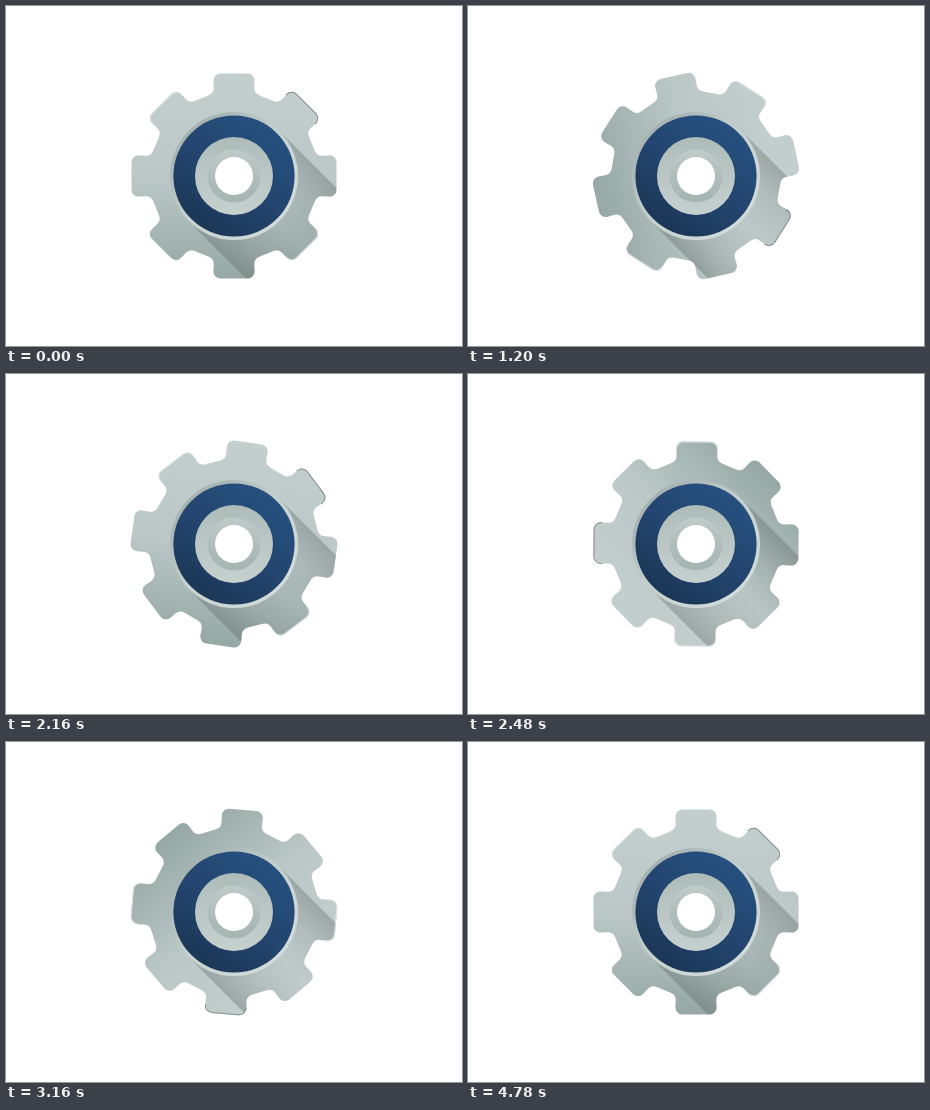
These frames come from a looping animation (456 by 340 pixels, 4800 ms). An HTML page with a canvas:

```html
<!DOCTYPE html>
<html lang="en">
<head>
<meta charset="utf-8">
<title>Turning gear</title>
<style>
  html, body { margin: 0; width: 100%; height: 100%; overflow: hidden; background: #fff; }
  canvas { display: block; }
</style>
</head>
<body>
<canvas id="stage" width="456" height="340"></canvas>
<script>
const ctx = document.getElementById('stage').getContext('2d');
const LOOP = 4800, TURN = 4170, STEP = 20, DEGREES = 1440;
const CX = 228, CY = 170;

function rotated([x, y], deg) {
  const a = deg * Math.PI / 180, c = Math.cos(a), s = Math.sin(a);
  return [x * c - y * s, x * s + y * c];
}

function gearPath() {
  const tooth = [[-20, -83, 8], [-21, -102.5, 7], [21, -102.5, 7], [20, -83, 8]];
  const path = new Path2D();
  const corners = [];
  for (let i = 0; i < 8; i++)
    for (const [x, y, r] of tooth) corners.push([...rotated([x, y], i * 45), r]);
  path.moveTo(0, -102.5);
  for (let i = 2; i < corners.length + 2; i++) {
    const [x, y, r] = corners[i % 32], [nx, ny] = corners[(i + 1) % 32];
    path.arcTo(x, y, nx, ny, r);
  }
  path.closePath();
  return path;
}

function tipPath(inset) {
  const path = new Path2D(), w = 21 - inset, top = -102.5 + inset;
  path.moveTo(-w, -94);
  path.arcTo(-w, top, 0, top, 7);
  path.arcTo(w, top, w, -94, 7);
  path.lineTo(w, -94);
  return path;
}

function gradient(x0, y0, x1, y1, ...colors) {
  const g = ctx.createLinearGradient(x0, y0, x1, y1);
  colors.forEach((color, i) => g.addColorStop(i / (colors.length - 1), color));
  return g;
}

function disc(r, fill) {
  ctx.beginPath();
  ctx.arc(0, 0, r, 0, Math.PI * 2);
  ctx.fillStyle = fill;
  ctx.fill();
}

function strokeTip(deg, color) {
  ctx.save();
  ctx.rotate(deg * Math.PI / 180);
  ctx.strokeStyle = color;
  ctx.stroke(tip);
  ctx.restore();
}

const gear = gearPath(), tip = tipPath(0.5);
const steel = gradient(0, -100, 0, 100, '#c3cfce', '#bbc8c7', '#96a9a7');
const shade = gradient(0, -64, 0, 64,
  'rgba(80,88,88,.32)', 'rgba(90,98,98,.13)', 'rgba(100,110,110,.03)',
  'rgba(90,98,98,.13)', 'rgba(80,88,88,.32)');
const edge = gradient(-45, -45, 45, 45, '#a5b2b1', '#c6d1cf', '#d2dbd9');
const navy = gradient(35, -50, -35, 50, '#26507f', '#23456f', '#1b3757');
const hub = gradient(0, -39, 0, 39, '#adbbb9', '#bac7c5', '#c5d0cf');
const bore = gradient(0, -27, 0, 27, '#bfcbc9', '#b0bebc', '#a3b4b2');

// Bezier easing with handles (.83, 0) and (.515, 1)
function ease(x) {
  let lo = 0, hi = 1;
  for (let i = 0; i < 30; i++) {
    const s = (lo + hi) / 2, q = 1 - s;
    if (3 * s * q * q * 0.83 + 3 * s * s * q * 0.515 + s * s * s < x) lo = s;
    else hi = s;
  }
  return lo * lo * (3 - 2 * lo);
}

function draw(t) {
  const deg = DEGREES * ease(Math.min(1, t / TURN));
  ctx.setTransform(1, 0, 0, 1, 0, 0);
  ctx.fillStyle = '#fff';
  ctx.fillRect(0, 0, 456, 340);
  ctx.translate(CX, CY);

  ctx.save();
  ctx.rotate(deg * Math.PI / 180);
  ctx.fillStyle = steel;
  ctx.fill(gear);
  ctx.clip(gear);
  // The long shadow stays put while the gear turns beneath it
  ctx.rotate(Math.PI / 4 - deg * Math.PI / 180);
  ctx.fillStyle = shade;
  ctx.fillRect(0, -64, 130, 128);
  ctx.restore();

  strokeTip(deg + 45, '#87908f');
  strokeTip(deg + 135, '#dbe3e2');
  strokeTip(deg - 45, '#dbe3e2');

  disc(64, edge);
  disc(60.6, navy);
  disc(39, hub);
  disc(26.5, bore);
  disc(19, '#fff');
}

function tick() {
  const t = performance.now() % LOOP;
  draw(Math.floor(t / STEP) * STEP);
  requestAnimationFrame(tick);
}
tick();
</script>
</body>
</html>
```
